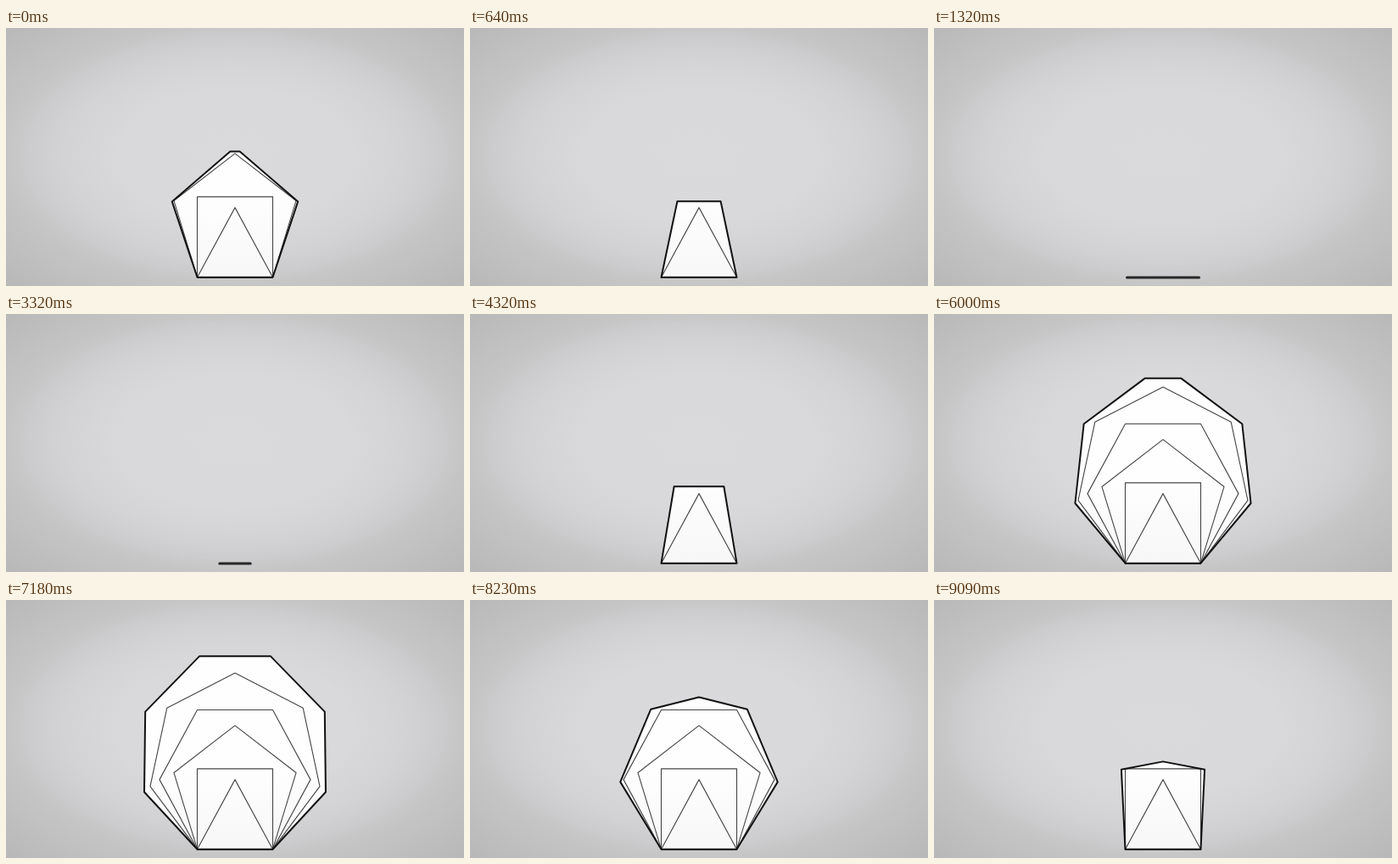
Animation, 540 px wide and 304 px high, one loop 9190 ms. Source, as an HTML page with a canvas:

```html
<!DOCTYPE html>
<html lang="en">
<head>
<meta charset="utf-8">
<title>Growing polygons</title>
<style>
  html, body { margin: 0; width: 100%; height: 100%; overflow: hidden; }
  body {
    background: radial-gradient(270px 155px at 270px 150px,
      #dad9dc 0%, #d9d8da 50%, #d3d2d4 75%, #cccbcd 90%, #c5c5c5 100%, #b8b8b8 140%);
  }
  canvas { display: block; }
</style>
</head>
<body>
<canvas id="stage" width="540" height="304"></canvas>
<script>
const ctx = document.getElementById('stage').getContext('2d');
const LOOP = 9190, CX = 270, BASE = 293.7, SIDE = 89, STRETCH = 1.065;

// [time in ms, number of sides]
const KEYS = [
  [0, 5.13], [280, 4.45], [1320, 1.98], [1700, 1.36], [2320, 1], [2820, 1],
  [3320, 1.43], [4450, 3.95], [5000, 5.13], [5410, 6.15], [6000, 7.48],
  [6360, 7.95], [6800, 8.08], [7180, 7.94], [7400, 7.82], [8410, 5.97],
  [9090, 4.17], [9190, 3.92]
];

const lerp = (a, b, f) => a + (b - a) * f;

function slope(i) {
  const a = KEYS[Math.max(0, i - 1)], b = KEYS[Math.min(KEYS.length - 1, i + 1)];
  return (b[1] - a[1]) / (b[0] - a[0]);
}

// Cubic Hermite curve through the keys
function sidesAt(t) {
  let i = 0;
  while (i < KEYS.length - 2 && t >= KEYS[i + 1][0]) i++;
  const [t0, a] = KEYS[i], [t1, b] = KEYS[i + 1];
  const d = t1 - t0, f = (t - t0) / d, g = 1 - f;
  return a * (1 + 2 * f) * g * g + b * f * f * (3 - 2 * f)
    + d * f * g * (g * slope(i) - f * slope(i + 1));
}

// Regular polygon on the base line, from the left foot clockwise to the right foot
function polygon(k) {
  const r = SIDE / 2 / Math.sin(Math.PI / k);
  const apothem = SIDE / 2 / Math.tan(Math.PI / k);
  return Array.from({ length: k }, (_, i) => {
    const a = Math.PI * (2 * i + 1) / k;
    return [CX - r * Math.sin(a), BASE - (apothem - r * Math.cos(a)) * STRETCH];
  });
}

// An odd polygon splits its apex; an even one bends its top edge
function morph(n) {
  const k = Math.floor(n), from = polygon(k), mid = k >> 1;
  const top = k % 2 ? from[mid] : [CX, from[mid][1]];
  from.splice(mid, 0, top);
  return polygon(k + 1).map(([x, y], i) =>
    [lerp(from[i][0], x, n - k), lerp(from[i][1], y, n - k)]);
}

function trace(points) {
  ctx.beginPath();
  points.forEach(p => ctx.lineTo(...p));
  ctx.closePath();
}

function stroke(color, width) {
  ctx.strokeStyle = color;
  ctx.lineWidth = width;
  ctx.stroke();
}

const paper = ctx.createLinearGradient(0, 200, 0, BASE);
paper.addColorStop(0, '#fefefe');
paper.addColorStop(1, '#f7f7f7');
ctx.lineCap = ctx.lineJoin = 'round';

function draw(n) {
  ctx.clearRect(0, 0, 540, 304);
  if (n < 2) {
    const half = ((n - 1) * SIDE - 2) / 2;
    if (half <= 0) return;
    ctx.beginPath();
    ctx.moveTo(CX - half, BASE + 0.3);
    ctx.lineTo(CX + half, BASE + 0.3);
    stroke('#262626', 3);
    return;
  }
  const outline = morph(n);
  trace(outline);
  ctx.fillStyle = paper;
  ctx.fill();
  for (let k = 3; k <= n; k++) {
    trace(polygon(k));
    stroke('#444', 1.1);
  }
  trace(outline);
  stroke('#111', 2);
}

function frame() {
  draw(sidesAt(performance.now() % LOOP));
  requestAnimationFrame(frame);
}
frame();
</script>
</body>
</html>
```
